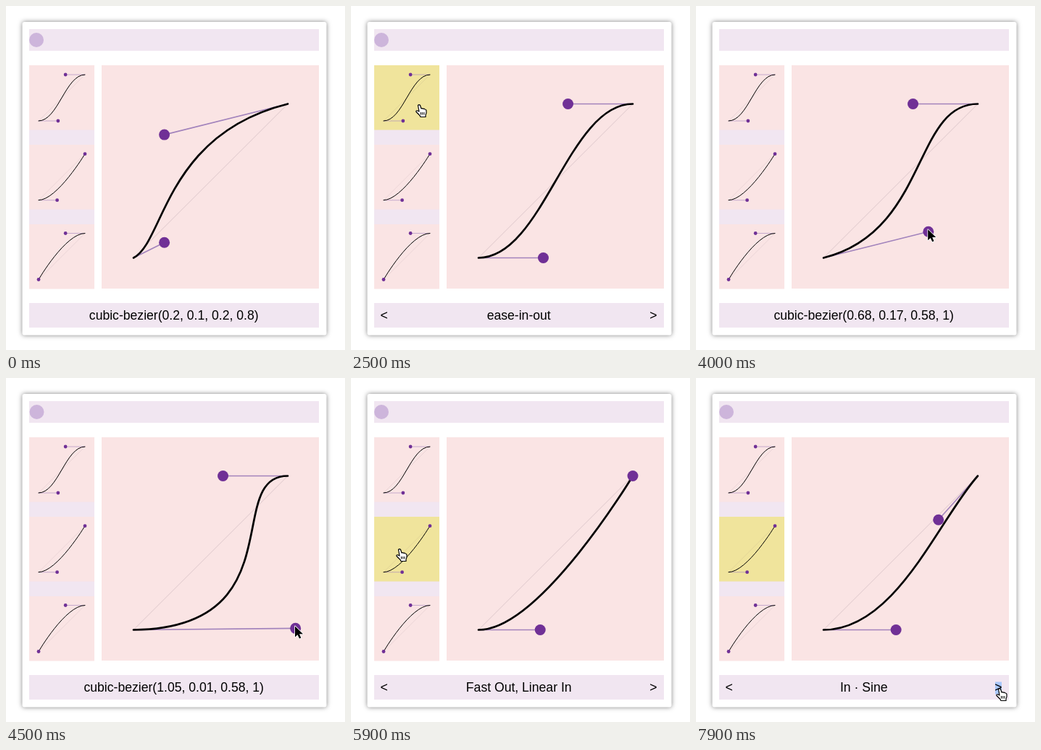
Write an HTML page with a canvas that moves like this. It is 468 by 476 pixels and loops after 8 s.

```html
<!DOCTYPE html>
<html lang="en">
<head>
<meta charset="utf-8">
<title>Easing editor</title>
<style>
  html, body { margin: 0; width: 100%; height: 100%; overflow: hidden; background: #fff; }
  canvas { display: block; }
</style>
</head>
<body>
<canvas id="stage" width="468" height="476"></canvas>
<script>
const ctx = document.getElementById('stage').getContext('2d');
const LOOP = 8000, STEP = 100, RUN = 1440, FADE = 160;
const LILAC = '#f1e6f1', PINK = '#fae4e4', YELLOW = '#f0e49c', PURPLE = '#703096';
const GRAPH = { x: 176, y: 348.5, size: 213 };
const GRIP = { x: 0.6, y: 3 };   // handle centre relative to the pointer tip

const IN_OUT = [0.42, 0, 0.58, 1], FAST_OUT = [0.4, 0, 1, 1];
const thumbs = [
  { top: 82, base: 159, curve: IN_OUT },
  { top: 192, base: 268.7, curve: FAST_OUT },
  { top: 302, base: 378.5, curve: [0, 0, 0.58, 1] },
];

// ball: time at which the preview ball sets off
const scenes = [
  { at: 0, curve: [0.2, 0.1, 0.2, 0.8], ball: LOOP },
  { at: 2500, name: 'ease-in-out', curve: IN_OUT, thumb: 0, ball: 2560 },
  { at: 3500, drag: true },
  { at: 4400, curve: [1.05, 0.01, 0.58, 1], ball: 4428 },
  { at: 5800, name: 'Fast Out, Linear In', curve: FAST_OUT, thumb: 1, ball: 5915 },
  { at: 7500, name: 'ease-in', curve: [0.42, 0, 1, 1], thumb: 1, ball: 7610 },
  { at: 7900, name: 'In · Sine', curve: [0.47, 0, 0.745, 0.715], thumb: 1, ball: LOOP },
];

// pointer tip: time, x, y
const pointerKeys = [
  [0, 472, 486], [100, 449, 468], [300, 427, 450], [1300, 427, 450],
  [1800, 156, 182], [1900, 156, 182], [2300, 94, 136], [2500, 94, 136],
  [3400, 264.9, 345.5], [3500, 264.9, 345.5], [4000, 320.2, 309.3],
  [4400, 399, 343.4], [5100, 399, 343.4], [5700, 67, 236], [6000, 67, 236],
  [6600, 425, 454], [6800, 407, 443], [6900, 410, 436], [7000, 423, 432],
  [7200, 419, 429], [LOOP, 419, 429],
];

const arrow = new Path2D('M0 0V15L3.5 11.8L6 17L8.3 16L6 10.8H11Z');
const hand = new Path2D('M-1.5 1.5Q0 -.3 1.5 1.5L3 6Q4.5 5 5.5 6.3Q7 5.6 8 7Q10 7 10 9Q10.5 12 9 15V17.5H2L1 15.5Q-2.5 12 -4 10.5Q-4.7 8.5 -2.5 8.8L0 10Z');
const knuckles = new Path2D('M2.5 11V14.5M4.7 11V14.5M6.9 11V14.5');

function rect(x, y, w, h, color) {
  ctx.fillStyle = color;
  ctx.fillRect(x, y, w, h);
}

function dot(x, y, r, color) {
  ctx.fillStyle = color;
  ctx.beginPath();
  ctx.arc(x, y, r, 0, 7);
  ctx.fill();
}

function text(s, x) {
  ctx.fillStyle = '#000';
  ctx.fillText(s, x, 434);
}

function stroke(color, width, trace) {
  ctx.strokeStyle = color;
  ctx.lineWidth = width;
  ctx.beginPath();
  trace();
  ctx.stroke();
}

function line(a, b, color, width) {
  stroke(color, width, () => { ctx.moveTo(...a); ctx.lineTo(...b); });
}

function pointerAt(t) {
  const i = pointerKeys.findIndex(k => k[0] > t);
  const [t0, x0, y0] = pointerKeys[i - 1], [t1, x1, y1] = pointerKeys[i];
  const u = (t - t0) / (t1 - t0), e = u * u * (3 - 2 * u);
  return { x: x0 + (x1 - x0) * e, y: y0 + (y1 - y0) * e };
}

function ease([x1, y1, x2, y2], p) {
  const axis = (a, b, s) => 3 * a * s * (1 - s) ** 2 + 3 * b * s * s * (1 - s) + s ** 3;
  let lo = 0, hi = 1;
  for (let i = 0; i < 30; i++) {
    const mid = (lo + hi) / 2;
    if (axis(x1, x2, mid) < p) lo = mid; else hi = mid;
  }
  return axis(y1, y2, lo);
}

function plot(x, y, size, [x1, y1, x2, y2], weight, handleWeight, r) {
  const point = (u, v) => [x + u * size, y - v * size];
  const start = point(0, 0), end = point(1, 1), a = point(x1, y1), b = point(x2, y2);
  line(start, end, 'rgba(120,90,110,.22)', r > 5 ? 1 : 0.5);
  line(start, a, '#a283bc', handleWeight);
  line(end, b, '#a283bc', handleWeight);
  ctx.lineCap = 'round';
  stroke('#000', weight, () => {
    ctx.moveTo(...start);
    ctx.bezierCurveTo(...a, ...b, ...end);
  });
  ctx.lineCap = 'butt';
  dot(...a, r, PURPLE);
  dot(...b, r, PURPLE);
}

function drawBall(t, start, curve) {
  const elapsed = Math.max(0, t - start);
  ctx.globalAlpha = Math.max(0, Math.min(1, 1 - (elapsed - RUN) / FADE));
  dot(42 + 380 * ease(curve, Math.min(1, elapsed / RUN)), 47, 10, '#cdb5db');
  ctx.globalAlpha = 1;
}

function drawPointer({ x, y }) {
  const overThumb = x < 122 && thumbs.some(({ top }) => y > top && y < top + 90);
  const overNext = x > 412 && x < 425 && y > 411 && y < 440;
  const isHand = overThumb || overNext;
  ctx.save();
  ctx.translate(x, y);
  ctx.lineJoin = 'round';
  ctx.lineWidth = isHand ? 1.2 : 1.6;
  ctx.strokeStyle = isHand ? '#000' : '#fff';
  ctx.fillStyle = isHand ? '#fff' : '#000';
  const shape = isHand ? hand : arrow;
  if (isHand) ctx.fill(shape);
  ctx.stroke(shape);
  if (isHand) {
    ctx.lineWidth = 1;
    ctx.stroke(knuckles);
  } else ctx.fill(shape);
  ctx.restore();
}

function draw(t) {
  const scene = scenes.findLast(s => s.at <= t);
  const pointer = pointerAt(t);
  const curve = scene.curve || [
    (pointer.x + GRIP.x - GRAPH.x) / GRAPH.size,
    (GRAPH.y - pointer.y - GRIP.y) / GRAPH.size,
    0.58, 1,
  ];

  rect(0, 0, 468, 476, '#fff');
  ctx.save();
  ctx.shadowColor = 'rgba(0,0,0,.5)';
  ctx.shadowBlur = 6;
  ctx.fillStyle = '#fff';
  ctx.beginPath();
  ctx.roundRect(22.5, 22, 420, 433.5, 3);
  ctx.fill();
  ctx.restore();

  rect(32, 32, 400, 30, LILAC);
  rect(32, 82, 90, 309, LILAC);
  rect(132, 82, 300, 309, PINK);
  rect(32, 411, 400, 34, LILAC);

  if (!scene.drag) drawBall(t, scene.ball, curve);
  thumbs.forEach((thumb, i) => {
    rect(32, thumb.top, 90, 89.5, i === scene.thumb ? YELLOW : PINK);
    plot(45, thumb.base, 64, thumb.curve, 1, 0.6, 2.4);
  });
  plot(GRAPH.x, GRAPH.y, GRAPH.size, curve, 2.7, 1.6, 7.5);

  ctx.font = '17.6px "Liberation Sans", Arial, sans-serif';
  ctx.textAlign = 'center';
  text(scene.name || `cubic-bezier(${curve.map(v => +v.toFixed(2)).join(', ')})`, 231.7);
  if (scene.name) {
    if (t >= 7800) rect(413, 420.5, 9, 17, '#a9c8fb');
    text('<', 45.7);
    text('>', 417.5);
  }
  drawPointer(pointer);
}

let origin;
function frame(now) {
  origin ??= now;
  draw(Math.floor((now - origin) % LOOP / STEP) * STEP);
  requestAnimationFrame(frame);
}
requestAnimationFrame(frame);
</script>
</body>
</html>
```
